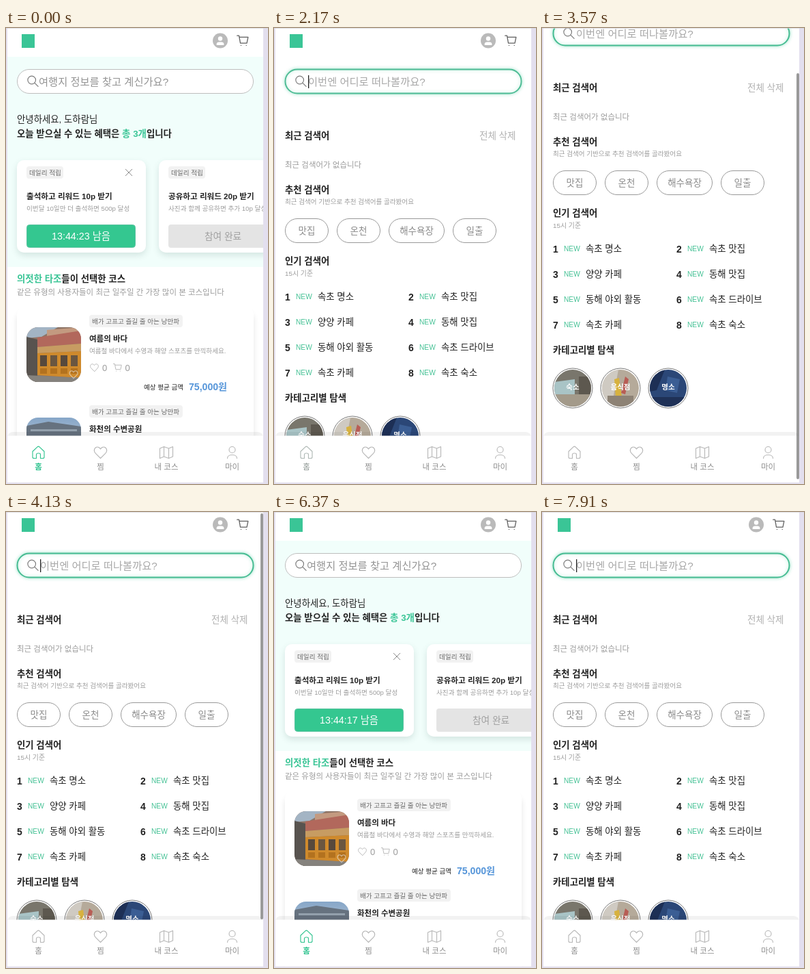
An HTML page with a canvas that plays this animation: 384x666 px, repeating every 8 s.

```html
<!DOCTYPE html>
<html lang="ko">
<head>
<meta charset="utf-8">
<style>
html, body { margin: 0; width: 100%; height: 100%; overflow: hidden; background: #e3dfee; }
canvas { display: block; width: 384px; height: 666px; }
</style>
</head>
<body>
<canvas id="stage"></canvas>
<script>
const W = 384, H = 666, LOOP = 8000;
const FONT = '"Liberation Sans", "Noto Sans CJK KR", "Noto Sans KR", "Noto Sans CJK", sans-serif';
const GREEN = '#3ac596', INK = '#222', GRAY = '#9c9c9c';

const canvas = document.getElementById('stage');
const ctx = canvas.getContext('2d');
const dpr = window.devicePixelRatio || 1;
canvas.width = W * dpr;
canvas.height = H * dpr;

const clamp = v => Math.max(0, Math.min(1, v));
const ramp = (t, a, b) => clamp((t - a) / (b - a));
const ease = p => p * p * (3 - 2 * p);
const mix = (a, b, p) => `rgb(${a.map((v, i) => Math.round(v + (b[i] - v) * p))})`;

// y is the vertical centre of the line
function text(s, x, y, size, color = INK, weight = 400, align = 'left') {
  ctx.font = `${weight} ${size}px ${FONT}`;
  ctx.fillStyle = color;
  ctx.textAlign = align;
  ctx.fillText(s, x, y + size * 0.37);
  return x + ctx.measureText(s).width;
}
const bold = (s, x, y, size = 13.4, color = INK) => text(s, x, y, size, color, 700);

function rect(x, y, w, h, color) {
  ctx.fillStyle = color;
  ctx.fillRect(x, y, w, h);
}

function round(x, y, w, h, r, fill, line, width = 1) {
  ctx.beginPath();
  ctx.roundRect(x, y, w, h, r);
  if (fill) { ctx.fillStyle = fill; ctx.fill(); }
  if (line) { ctx.strokeStyle = line; ctx.lineWidth = width; ctx.stroke(); }
}

function disc(x, y, r, fill, line) {
  round(x - r, y - r, 2 * r, 2 * r, r, fill, line);
}

function poly(points, color) {
  ctx.beginPath();
  points.forEach(([x, y]) => ctx.lineTo(x, y));
  ctx.fillStyle = color;
  ctx.fill();
}

function shadowed(color, blur, dy, draw) {
  ctx.save();
  ctx.shadowColor = color;
  ctx.shadowBlur = blur * dpr;
  ctx.shadowOffsetY = dy * dpr;
  draw();
  ctx.restore();
}

function clipped(x, y, w, h, r, draw) {
  ctx.save();
  ctx.beginPath();
  ctx.roundRect(x, y, w, h, r);
  ctx.clip();
  ctx.translate(x, y);
  draw();
  ctx.restore();
}

// Line icons, centred on 0,0
const ICONS = {
  home: 'M-8.5-1.5 L-1.5-8.2 Q0-9.5 1.5-8.2 L8.5-1.5 V6.5 Q8.5 8.5 6.5 8.5 H3 V3 Q3 1 0 1 Q-3 1-3 3 V8.5 H-6.5 Q-8.5 8.5-8.5 6.5 Z',
  heart: 'M0 8.5 L-7.6 .8 C-10.8-2.8-8.6-8-4.6-8 C-2.4-8-1-6.8 0-5 C1-6.8 2.4-8 4.6-8 C8.6-8 10.8-2.8 7.6 .8 Z',
  map: 'M-9.5-6 L-3.5-8.5 L3.5-6 L9.5-8.5 V6 L3.5 8.5 L-3.5 6 L-9.5 8.5 Z M-3.5-8.5 V6 M3.5-6 V8.5',
  person: 'M0-8.5 A4.5 4.5 0 0 1 0 .5 A4.5 4.5 0 0 1 0-8.5 M-7 8.5 C-7 1.8 7 1.8 7 8.5',
  cart: 'M-9-8 H-6 L-3.8 4 H6.5 L8.5-5.5 H-5.3 M-2.8 7.5 h.1 M5.6 7.5 h.1',
  close: 'M-5-5 L5 5 M5-5 L-5 5',
  search: 'M5-2 A5.8 5.8 0 1 1-6.6-2 A5.8 5.8 0 1 1 5-2 M3.4 2.2 L8.6 7.4'
};
for (const name in ICONS) ICONS[name] = new Path2D(ICONS[name]);

function icon(name, x, y, color, width = 1.2, scale = 1) {
  ctx.save();
  ctx.translate(x, y);
  ctx.scale(scale, scale);
  ctx.strokeStyle = color;
  ctx.lineWidth = width / scale;
  ctx.lineCap = ctx.lineJoin = 'round';
  ctx.stroke(ICONS[name]);
  ctx.restore();
}

function header() {
  rect(23, 9, 19, 20, GREEN);
  disc(314, 18.5, 11, '#bababa');
  disc(314, 15.5, 3.2, '#fff');
  round(308.5, 20.5, 11, 4.5, [5, 5, 1, 1], '#fff');
  icon('cart', 347, 18.5, '#606060', 1.3, 0.92);
}

function searchBox(focus, hint, x, color) {
  const line = mix([190, 190, 190], [70, 188, 146], focus);
  const draw = () => round(16.5, 60.5, 346, 35, 17.5, '#fff', line, 1 + focus);
  shadowed(`rgba(51,196,145,${0.4 * focus})`, 5, 0, draw);
  icon('search', 38.5, 78, '#7c7c7c', 1.2);
  text(hint, x, 78, 15.3, color);
}

function badge(s, x, y, w) {
  round(x, y, w, 18, 4, '#f2f2f2');
  text(s, x + 4, y + 9, 9.6, '#686868');
}

function rewardCard(x, title, note, label, active) {
  shadowed('rgba(50,90,78,.15)', 10, 4, () => round(x, 193, 189, 135, 10, '#fff'));
  badge('데일리 적립', x + 14, 202, 54);
  bold(title, x + 14, 246, 11.6);
  text(note, x + 14, 263, 9.6, GRAY);
  if (active) {
    icon('close', 180, 211, '#8c8c8c', 1, 0.95);
    round(30.5, 287.5, 159, 33, 4, '#34c790', '#5cc3a0');
    text(label, 110, 304, 14.3, '#fff', 400, 'center');
  } else {
    round(x + 14, 287, 160, 34, 4, '#e4e4e4');
    text(label, x + 94, 304, 13.7, '#a0a0a0', 400, 'center');
  }
}

function shopPhoto() {
  rect(0, 0, 80, 80, '#8d7466');
  poly([[0, 0], [46, 0], [22, 14], [0, 16]], '#a3b4c4');
  poly([[30, 4], [80, 0], [80, 10], [30, 16]], '#c39a80');
  poly([[16, 15], [80, 5], [80, 24], [16, 29]], '#b2685c');
  poly([[0, 14], [16, 18], [16, 80], [0, 80]], '#58534f');
  poly([[16, 29], [80, 24], [80, 35], [16, 38]], '#c79c62');
  poly([[16, 38], [80, 35], [80, 74], [16, 70]], '#cf8a2c');
  for (let i = 0; i < 4; i++) {
    rect(20 + i * 15, 41, 10, 16, i % 2 ? '#6a5640' : '#57493c');
    rect(20 + i * 15, 60, 10, 8, '#b3721f');
  }
  poly([[0, 70], [80, 74], [80, 80], [0, 80]], '#85827d');
}

function parkPhoto() {
  const sky = ctx.createLinearGradient(0, 0, 0, 28);
  sky.addColorStop(0, '#86a6c8');
  sky.addColorStop(1, '#a9bdd0');
  rect(0, 0, 80, 80, sky);
  poly([[0, 12], [32, 6], [80, 13], [80, 40], [0, 40]], '#66727f');
  rect(6, 17, 68, 3, '#93a0ac');
}

function course(y, name, photo) {
  badge('배가 고프고 즐길 줄 아는 낭만파', 122, y, 137);
  clipped(30, y + 18, 80, 80, 17, photo);
  bold(name, 122, y + 35, 11.5);
}

function home(time, focus) {
  rect(0, 42, W, 307, '#f1fefb');
  searchBox(focus, '여행지 정보를 찾고 계신가요?', 48, '#949494');
  text('안녕하세요, 도하람님', 16, 133, 13.4);
  let x = bold('오늘 받으실 수 있는 혜택은 ', 16, 154);
  x = bold('총 3개', x, 154, 13.4, GREEN);
  bold('입니다', x, 154);

  const left = 23 - (time < 840 ? 0 : 1 + Math.floor((time - 840) / 1030));
  rewardCard(16, '출석하고 리워드 10p 받기', '이번달 10일만 더 출석하면 500p 달성', `13:44:${left} 남음`, true);
  rewardCard(224, '공유하고 리워드 20p 받기', '사진과 함께 공유하면 추가 10p 달성', '참여 완료', false);

  x = bold('의젓한 타조', 16, 366, 13.4, GREEN);
  bold('들이 선택한 코스', x, 366);
  text('같은 유형의 사용자들이 최근 일주일 간 가장 많이 본 코스입니다', 16, 385.5, 11.5, GRAY);

  shadowed('rgba(0,0,0,.1)', 8, 8, () => round(16, 408, 347, 280, 10, '#fff'));
  course(419, '여름의 바다', shopPhoto);
  icon('heart', 99, 506, 'rgba(235,240,245,.6)', 1.1, 0.65);
  text('여름철 바다에서 수영과 해양 스포츠를 만끽하세요.', 122, 471.5, 9.55, GRAY);
  icon('heart', 129.5, 496, '#bcbcbc', 1, 0.65);
  text('0', 141, 496.5, 13, GRAY);
  icon('cart', 163.5, 496, '#bcbcbc', 1, 0.68);
  text('0', 174.5, 496.5, 13, GRAY);
  text('예상 평균 금액', 202, 524, 9.55, INK, 500);
  bold('75,000원', 268, 524, 14.1, '#5595d9');
  course(551, '화천의 수변공원', parkPhoto);
}

const CHIPS = [['맛집', 16, 64], ['온천', 92, 64], ['해수욕장', 168, 82], ['일출', 262, 64]];
const RANKS = ['속초 명소', '속초 맛집', '양양 카페', '동해 맛집', '동해 야외 활동', '속초 드라이브', '속초 카페', '속초 숙소'];
const CATEGORIES = [
  ['숙소', () => {
    rect(0, 0, 54, 54, '#79766c');
    poly([[0, 18], [30, 14], [30, 40], [0, 44]], '#a9c4c6');
    rect(36, 10, 18, 30, '#5d584f');
    rect(0, 36, 54, 18, '#a39a8a');
  }],
  ['음식점', () => {
    rect(0, 0, 54, 54, '#b5aa9a');
    poly([[0, 0], [24, 0], [14, 54], [0, 54]], '#cfcac2');
    poly([[18, 14], [25, 12], [29, 40], [20, 40]], '#d7b23f');
    poly([[34, 10], [39, 14], [34, 36], [28, 34]], '#b85d55');
    rect(8, 38, 38, 16, '#8d8275');
  }],
  ['명소', () => {
    rect(0, 0, 54, 54, '#2b4777');
    poly([[0, 0], [22, 0], [10, 30], [0, 32]], '#1d2f55');
    poly([[26, 10], [44, 14], [40, 34], [23, 30]], '#3b5e94');
    rect(0, 40, 54, 14, '#1f3157');
  }]
];

function search(focus, caret) {
  searchBox(focus, '이번엔 어디로 떠나볼까요?', 50, '#a8a8a8');
  if (caret) rect(50, 69, 1.3, 19, '#222');

  bold('최근 검색어', 16, 157);
  text('전체 삭제', 301, 157, 13.5, '#b0b0b0');
  text('최근 검색어가 없습니다', 16, 200, 11.5, GRAY);
  bold('추천 검색어', 16, 236);
  text('최근 검색어 기반으로 추천 검색어를 골라봤어요', 16, 253, 9.55, GRAY);
  for (const [name, x, w] of CHIPS) {
    round(x + 0.5, 278.5, w - 1, 35, 17.5, '#fff', '#999');
    text(name, x + w / 2, 296, 13.5, '#8a8a8a', 400, 'center');
  }

  bold('인기 검색어', 16, 340);
  text('15시 기준', 16, 358, 9.9, GRAY);
  RANKS.forEach((word, i) => {
    const x = 16 + (i % 2) * 181, y = 392.5 + (i >> 1) * 37;
    bold(String(i + 1), x, y, 14);
    text('NEW', x + 16, y, 10.2, '#47c296');
    text(word, x + 48, y, 13.4);
  });

  bold('카테고리별 탐색', 16, 540);
  CATEGORIES.forEach(([name, photo], i) => {
    const x = 45 + i * 70, y = 596;
    disc(x, y, 29, '#fff', '#777');
    clipped(x - 27, y - 27, 54, 54, 27, photo);
    text(name, x, y - 1.5, 10.5, '#fff', 700, 'center');
  });
}

const TABS = [['home', '홈', 47.5], ['heart', '찜', 138.5], ['map', '내 코스', 235], ['person', '마이', 331.5]];

function nav(focus) {
  round(2, 590, 375, 30, [8, 8, 0, 0], 'rgba(0,0,0,.05)');
  rect(2, 595.5, 375, 70, '#fff');
  TABS.forEach(([name, label, x], i) => {
    const on = i ? 1 : focus;
    icon(name, x, 620, mix([51, 196, 145], [184, 184, 184], on), 1.15);
    text(label, x, 640.5, 11.5, mix([51, 196, 145], [142, 142, 142], on), i || focus > 0.5 ? 400 : 600, 'center');
  });
}

function scrollBar(scroll, alpha) {
  if (alpha > 0) round(373, 2 + scroll * 0.914, 4, 593, 2, `rgba(128,128,128,${0.8 * alpha})`);
}

const OPEN = [1960, 6860], BACK = 5810;

function draw(t) {
  const searching = (t >= OPEN[0] && t < BACK) || t >= OPEN[1];
  const start = t >= OPEN[1] ? OPEN[1] : OPEN[0];
  const focus = searching ? ease(ramp(t, start - 50, start + 260)) : t >= BACK ? 1 - ease(ramp(t, BACK - 50, BACK + 300)) : 0;
  const caret = start === OPEN[1]
    ? t < 7350 || t >= 7910
    : t < 2520 || Math.floor((t - 2480) / 524) % 2 === 1;
  const scroll = 70 * (ease(ramp(t, 3230, 3360)) - ease(ramp(t, 3650, 4130)));
  const bar = t < 3270 ? 0 : 1 - ramp(t, 4430, 4830);

  ctx.setTransform(dpr, 0, 0, dpr, 0, 0);
  rect(0, 0, W, H, '#e3dfee');
  ctx.save();
  ctx.beginPath();
  ctx.rect(2, 0, 375, 663.5);
  ctx.clip();
  rect(0, 0, W, H, '#fff');
  ctx.save();
  ctx.translate(0, -scroll);
  header();
  if (searching) search(focus, caret);
  else home(t, focus);
  ctx.restore();
  nav(focus);
  scrollBar(scroll, bar);
  ctx.restore();
  rect(0, 0, W, 0.7, '#d6d4dc');
}

const begin = performance.now();
function tick() {
  draw((performance.now() - begin) % LOOP);
  requestAnimationFrame(tick);
}
tick();
</script>
</body>
</html>
```
